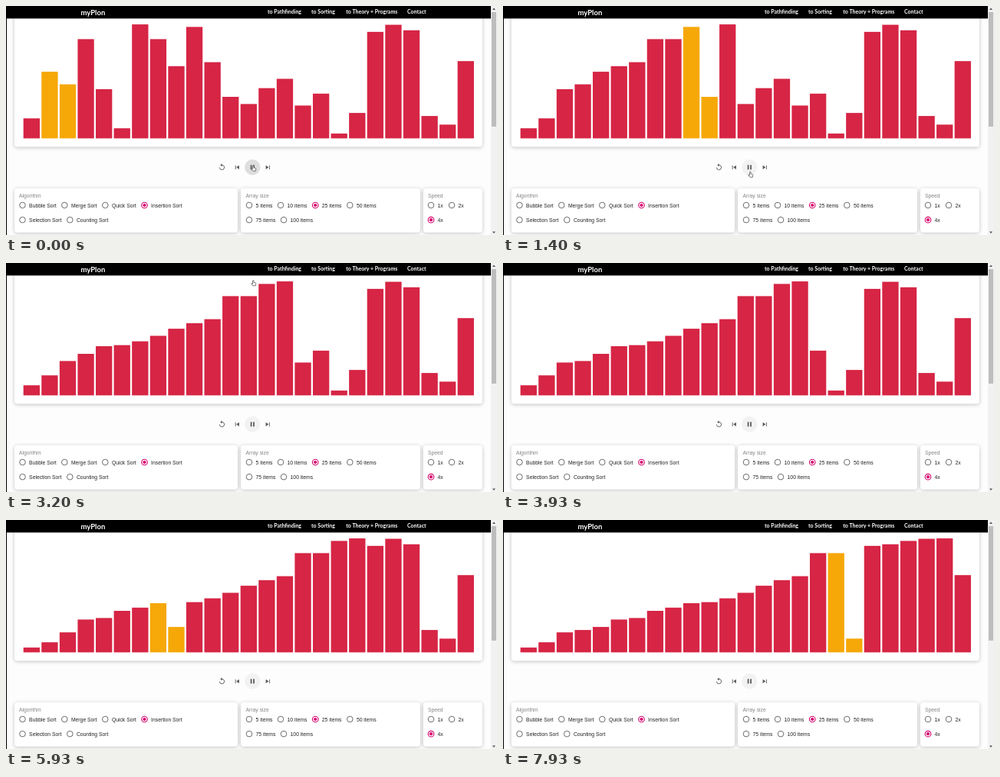
These frames come from a looping animation (640x300 px, 8 s). An HTML page:

```html
<!DOCTYPE html>
<html lang="en">
<head>
<meta charset="utf-8">
<title>Insertion sort</title>
<style>
  html, body { margin: 0; width: 100%; height: 100%; overflow: hidden; background: #fdfdfd; }
  svg { display: block; width: 640px; height: 300px; }
  text { font: 6.8px "Liberation Sans", Arial, sans-serif; fill: #222; }
  .nav { font: 700 7px Lato, sans-serif; fill: #fff; }
  .logo { font: 700 9.5px Lato, sans-serif; fill: #fff; }
  .title { fill: #858585; }
  .card { fill: #fff; filter: drop-shadow(0 1px 2.5px rgba(0, 0, 0, .24)); }
  .icon { fill: #555; }
</style>
</head>
<body>
<svg id="stage" viewBox="0 0 640 300"></svg>
<script>
const LOOP = 8000, FRAME = 200 / 3, STEP = 50.55;
const RED = '#d62545', ORANGE = '#f6a808', PINK = '#d5006c';
const BASE = 173.4, PITCH = 23.58;
const stage = document.getElementById('stage');

function add(tag, attrs, content) {
  const el = document.createElementNS('http://www.w3.org/2000/svg', tag);
  for (const key in attrs) el.setAttribute(key, attrs[key]);
  if (content) el.textContent = content;
  return stage.appendChild(el);
}
const rect = (x, y, width, height, fill) => add('rect', { x, y, width, height, fill });
const label = (x, y, content, cls = '') => add('text', { x, y, class: cls }, content);
const card = (x, y, width, height) => add('rect', { x, y, width, height, rx: 4, class: 'card' });
const icon = (cx, cy, d) =>
  add('path', { d, class: 'icon', transform: `translate(${cx} ${cy}) scale(.43) translate(-12 -12)` });

function radio(x, y, content, selected) {
  const color = selected ? PINK : '#5c5c5c';
  add('circle', { cx: x, cy: y, r: 3.8, fill: 'none', stroke: color, 'stroke-width': selected ? 1.1 : .9 });
  if (selected) add('circle', { cx: x, cy: y, r: 2.1, fill: color });
  label(x + 8.6, y + 2.6, content);
}

// Every comparison is one step; only pairs about to be swapped are highlighted.
function insertionSteps(values, start) {
  const a = [...values], steps = [];
  for (let i = start; i < a.length; i++) {
    for (let j = i; j > 0; j--) {
      const swap = a[j - 1] > a[j];
      steps.push({ heights: [...a], active: swap ? j : -1 });
      if (!swap) break;
      [a[j - 1], a[j]] = [a[j], a[j - 1]];
    }
  }
  return steps;
}

const steps = insertionSteps([26.2, 87.3, 70.8, 130, 64.4, 13.2, 149.3, 130, 94.6, 146, 99.8, 54.4, 45,
  65.8, 78, 43, 58.6, 6.3, 33.3, 139.5, 148.8, 141.6, 29.3, 18, 101.2], 2);

// Chart and header
card(11, -10, 610, 194.6);
const bars = steps[0].heights.map((h, i) => rect(22.7 + i * PITCH, 0, 21.3, 0, RED));
rect(0, 0, 632, 16.4, '#000');
label(97.5, 12.2, 'myPlon', 'logo');
[[341, 'to Pathfinding'], [398, 'to Sorting'], [443.3, 'to Theory + Programs'], [523, 'Contact']]
  .forEach(([x, name]) => label(x, 10.4, name, 'nav'));

// Playback controls
const pauseDisc = add('circle', { cx: 321.3, cy: 211.3, r: 10.2 });
icon(281.5, 211, 'M12 5V1L7 6l5 5V7c3.31 0 6 2.69 6 6s-2.69 6-6 6-6-2.69-6-6H4c0 4.42 3.58 8 8 8s8-3.58 8-8-3.58-8-8-8z');
icon(301.3, 211.3, 'M6 6h2v12H6zm3.5 6l8.5 6V6z');
icon(321.3, 211.3, 'M6 19h4V5H6zM14 5v14h4V5z');
icon(341.2, 211.3, 'M6 18l8.5-6L6 6zM16 6v12h2V6z');

// Settings
card(11, 238.7, 291, 58);
card(306, 238.7, 234, 58);
card(544, 238.7, 77, 58);
label(17, 251, 'Algorithm', 'title');
label(312.5, 251, 'Array size', 'title');
label(550, 251, 'Speed', 'title');
[[21.5, 'Bubble Sort'], [76.3, 'Merge Sort'], [129.3, 'Quick Sort'], [180.5, 'Insertion Sort', true],
 [317, '5 items'], [358, '10 items'], [403.2, '25 items', true], [448.3, '50 items'],
 [554, '1x'], [581, '2x']].forEach(([x, name, on]) => radio(x, 261, name, on));
[[21.5, 'Selection Sort'], [83.3, 'Counting Sort'], [317, '75 items'], [362, '100 items'],
 [554, '4x', true]].forEach(([x, name, on]) => radio(x, 280.2, name, on));

// Window edge and scrollbar
rect(0, 0, 1, 300, '#000');
rect(632, 0, 8, 300, '#f1f1f1');
rect(633, 8, 6, 150, '#bdbdbd');
add('path', { d: 'M634 5l2-2.5 2 2.5zM634 295.5l2 2.5 2-2.5z', fill: '#555' });

const cursor = add('path', {
  d: 'M-.7 .5q.7-.9 1.4 0v2.3l2.4.7q.5.2.4.9l-.5 2.8h-3.6l-2-2.8q.2-.9 1.1-.3l.8.7z',
  fill: '#fff', stroke: '#222', 'stroke-width': .6
});

const ease = (t, from, to) => {
  const p = Math.min(1, Math.max(0, (t - from) / (to - from)));
  return p * p * (3 - 2 * p);
};

function draw(time) {
  const t = Math.floor((time % LOOP + 6.7) / FRAME) * FRAME;
  const { heights, active } = steps[Math.min(steps.length - 1, Math.floor(t / STEP + .15))];
  bars.forEach((bar, i) => {
    bar.setAttribute('y', BASE - heights[i]);
    bar.setAttribute('height', heights[i]);
    bar.setAttribute('fill', i === active || i === active - 1 ? ORANGE : RED);
  });
  const shade = Math.round(222 + 20 * ease(t, 60, 400));
  pauseDisc.setAttribute('fill', `rgb(${shade},${shade},${shade})`);
  const y = 209 + 8 * ease(t, 200, 700) - 217 * ease(t, 2800, 3300);
  cursor.setAttribute('transform', `translate(322.3 ${y})`);
  cursor.setAttribute('visibility', t < 3300 ? 'visible' : 'hidden');
}

const began = performance.now();
function tick() {
  draw(performance.now() - began);
  requestAnimationFrame(tick);
}
tick();
</script>
</body>
</html>
```
